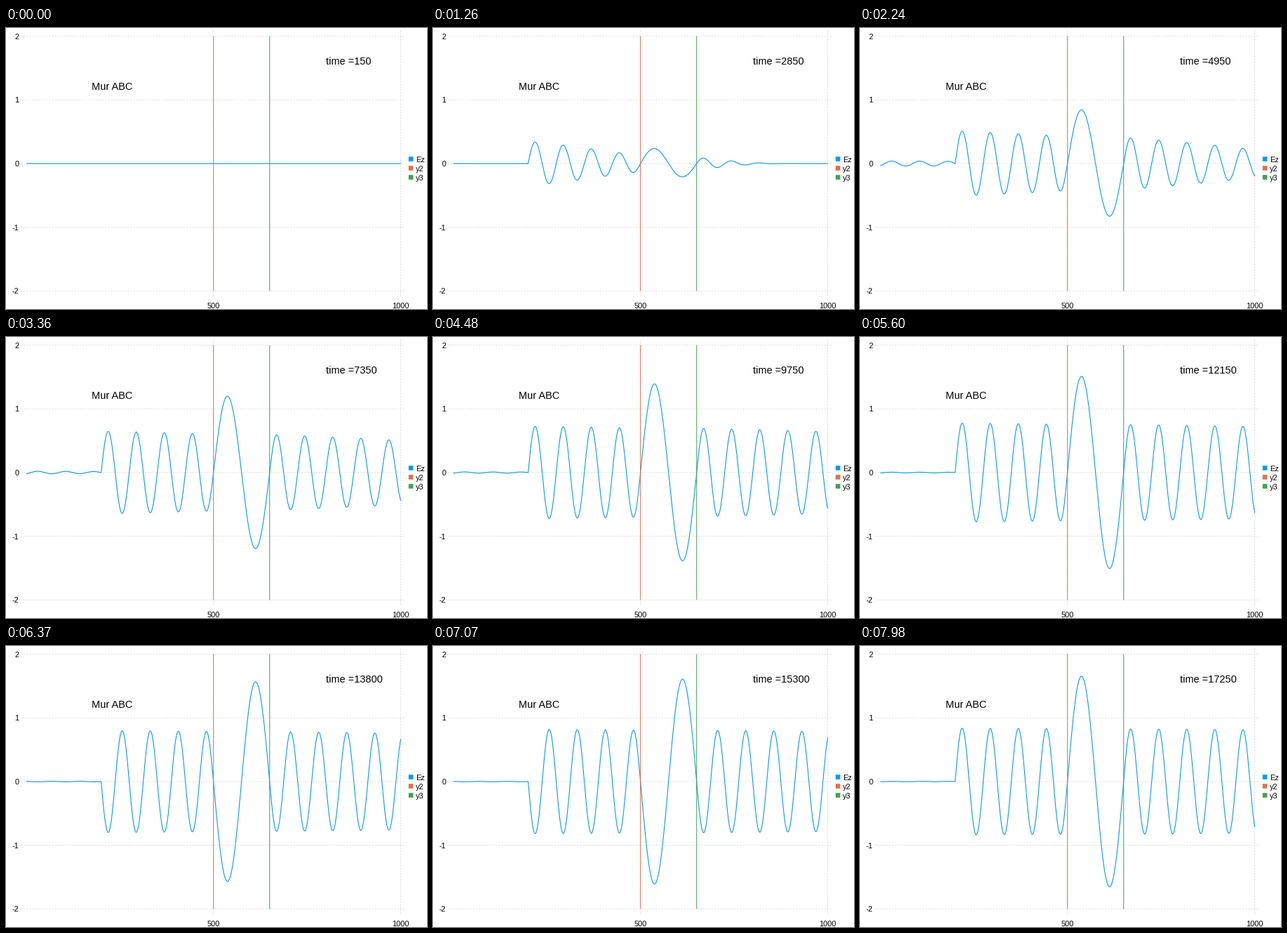
Recreate the animation shown at these times as a matplotlib script. Size 600 by 400 pixels, loop 8 s.

```python
import math

import numpy as np
import matplotlib.pyplot as plt
from matplotlib.animation import FuncAnimation
from matplotlib.patches import Rectangle

W, H, DPI = 600, 400, 100
PX = 72 / DPI                      # one pixel in points
LOOP, TICK, HOLD = 8000, 20, 70    # ms
STEPS = 150                        # simulation steps per picture
SHOTS = 115

CELLS, SRC = 1000, 199
SLAB = slice(499, 649)
COURANT, EPS = 0.5, 4.0
PERIOD, RAMP = 300, 3000

BLUE, ORANGE, GREEN = "#009afa", "#e36f47", "#3ea44e"

plt.rcParams["font.family"] = "Liberation Sans"
plt.rcParams["path.snap"] = False


def incident(t):
    if t <= 0:
        return 0.0
    return math.exp(-RAMP / t) * math.sin(2 * math.pi * t / PERIOD)


def simulate():
    """1D FDTD: one-way source, faster slab, Mur boundaries."""
    e = np.zeros(CELLS)
    h = np.zeros(CELLS - 1)
    ce = np.full(CELLS, COURANT / EPS)
    ce[SLAB] = COURANT
    ce = ce[1:-1]
    index = math.sqrt(EPS)
    speed = COURANT / index
    mur = (speed - 1) / (speed + 1)
    lead = 0.5 + 0.5 / speed
    shots = []
    for n in range(SHOTS * STEPS):
        h += COURANT * (e[1:] - e[:-1])
        h[SRC - 1] -= COURANT * incident(n)
        a0, a1, b1, b0 = e[0], e[1], e[-2], e[-1]
        e[1:-1] += ce * (h[1:] - h[:-1])
        e[SRC] += COURANT / EPS * index * incident(n + lead)
        e[0] = a1 + mur * (e[1] - a0)
        e[-1] = b1 + mur * (e[-2] - b0)
        if (n + 1) % STEPS == 0:
            shots.append(e.copy())
    return shots


def px(x):
    return 28.9 + 0.5336 * x


def py(y):
    return 192.95 - 90.7 * y


shots = simulate()

fig = plt.figure(figsize=(W / DPI, H / DPI), dpi=DPI, facecolor="white")
ax = fig.add_axes([0, 0, 1, 1])
ax.set_xlim(0, W)
ax.set_ylim(H, 0)
ax.axis("off")


def label(x, y, text, size=11, ha="left"):
    return ax.text(x, y, text, fontsize=size * PX, ha=ha, va="baseline",
                   color="black")


def grid(xs, ys):
    ax.plot(xs, ys, color="#d9d9d9", lw=PX, dashes=(2, 2),
            dash_capstyle="butt", zorder=1)


for v in range(-2, 3):
    grid([21.5, 569], [py(v)] * 2)
    label(18.3, py(v) + 4, str(v), ha="right")
for v in (500, 1000):
    grid([px(v)] * 2, [3.5, 382])
    label(px(v), 399, str(v), ha="center")

wave, = ax.plot(px(np.arange(1, CELLS + 1)), py(shots[0]), color=BLUE,
                lw=1.1 * PX, zorder=2)
for v, color in ((500, ORANGE), (650, GREEN)):
    ax.plot([px(v)] * 2, [py(2), py(-2)], color=color, lw=PX, zorder=3,
            solid_capstyle="butt")

for i, (name, color) in enumerate((("Ez", BLUE), ("y2", ORANGE),
                                   ("y3", GREEN))):
    y = 186.5 + 13 * i
    ax.add_patch(Rectangle((573.8, y - 3.3), 6.6, 6.6, fc=color, lw=0))
    label(583.8, y + 4.3, name)

label(121.8, 88, "Mur ABC", 14.5)
clock = label(455.8, 52, "", 14.5)


def update(i):
    k = min((i * TICK + TICK // 2) // HOLD, SHOTS - 1)
    wave.set_ydata(py(shots[k]))
    clock.set_text(f"time ={(k + 1) * STEPS}")
    return wave, clock


anim = FuncAnimation(fig, update, frames=LOOP // TICK, interval=TICK,
                     repeat=True, repeat_delay=0)
plt.show()
```
